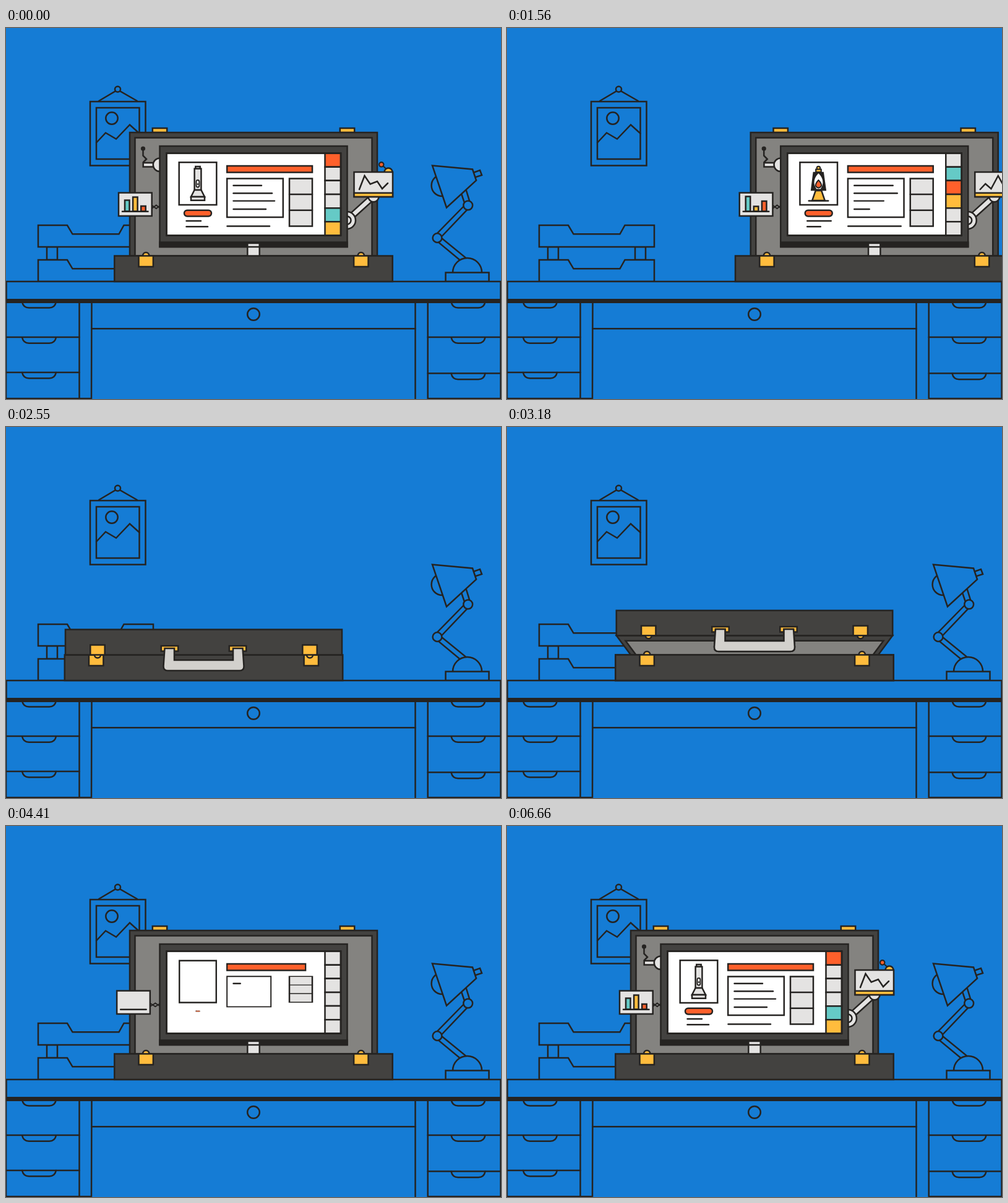
Recreate the animation shown at these times as an HTML page with a canvas. Size 800x600 px, loop 6690 ms.

```html
<!DOCTYPE html>
<html lang="en">
<head>
<meta charset="utf-8">
<title>Briefcase workstation</title>
<style>
html, body { margin: 0; width: 100%; height: 100%; overflow: hidden; background: #157cd5; }
canvas { display: block; width: 800px; height: 600px; }
</style>
</head>
<body>
<canvas id="stage" width="800" height="600"></canvas>
<script>
const g = document.getElementById('stage').getContext('2d');
const LOOP = 6690, STEP = 30;
const BLUE = '#157cd5', INK = '#252321', DARK = '#434240', GREY = '#848380',
  LIGHT = '#e4e3e2', WHITE = '#ffffff', ORANGE = '#ff602b', YELLOW = '#ffbc3d', TEAL = '#65cac6';
const CELL = { w: LIGHT, T: TEAL, O: ORANGE, Y: YELLOW };

// Easing
const clamp = u => Math.max(0, Math.min(1, u));
const span = (t, a, b) => clamp((t - a) / (b - a));
const smooth = u => u * u * (3 - 2 * u);
const easeOut = u => 1 - (1 - u) ** 3;
const backOut = (u, c) => 1 + (c + 1) * (u - 1) ** 3 + c * (u - 1) ** 2;
const mix = (a, b, u) => a + (b - a) * u;

// Drawing helpers
function paint(fill, line = 2.5) {
  if (fill) { g.fillStyle = fill; g.fill(); }
  if (line) { g.lineWidth = line; g.stroke(); }
}
function box(x1, y1, x2, y2, fill, line) {
  g.beginPath();
  g.rect(x1, y1, x2 - x1, y2 - y1);
  paint(fill, line);
}
function trace(p, close) {
  g.beginPath();
  for (let i = 0; i < p.length; i += 2) g.lineTo(p[i], p[i + 1]);
  if (close) g.closePath();
}
function poly(p, fill, line) { trace(p, true); paint(fill, line); }
function path(p, line) { trace(p); paint(null, line); }
function disc(x, y, r, fill, line) {
  g.beginPath();
  g.arc(x, y, r, 0, 7);
  paint(fill, line);
}
function dome(x, y, r, fill, down) {
  g.beginPath();
  g.arc(x, y, r, Math.PI, 0, !!down);
  paint(fill);
}
function bar(x1, y1, x2, y2, w, fill) {
  g.lineCap = 'butt';
  path([x1, y1, x2, y2], w + 5);
  g.strokeStyle = fill;
  path([x1, y1, x2, y2], w);
  g.strokeStyle = INK;
  g.lineCap = 'round';
}
function about(x, y, fn) {
  g.save();
  g.translate(x, y);
  fn();
  g.translate(-x, -y);
}

// Room
function picture() {
  path([150, 118, 180.5, 100, 212, 118]);
  disc(180.5, 99, 4.5, BLUE);
  box(136, 119, 225.5, 222.5, BLUE);
  box(146, 129, 215.5, 212);
  disc(171, 146, 9.7);
  path([146, 185.5, 161, 169.5, 178, 179.5, 200, 156.5, 215.5, 170.5]);
}
function trays() {
  box(66, 354, 83, 375, BLUE);
  box(207, 354, 224, 375, BLUE);
  for (const y of [319, 375])
    poly([52, y, 99, y, 107.5, y + 14.3, 182.5, y + 14.3, 190.5, y, 238, y, 238, y + 35, 52, y + 35], BLUE);
}
function pull(x, y) {
  g.beginPath();
  g.moveTo(x, y);
  g.quadraticCurveTo(x + 2, y + 9.5, x + 11, y + 9.5);
  g.lineTo(x + 44, y + 9.5);
  g.quadraticCurveTo(x + 53, y + 9.5, x + 55, y);
  paint();
}
function desk() {
  box(0.5, 410, 799.5, 441, BLUE);
  box(0, 441, 118.5, 599.3);
  path([118.5, 599.3, 138, 599.3, 138.5, 441]);
  box(681.7, 441, 799.5, 599.3);
  path([661.5, 441, 661.5, 599.3]);
  path([138.5, 486.3, 661.5, 486.3]);
  for (const y of [500, 557]) path([0, y, 118.5, y]);
  for (const y of [500, 558.5]) path([681.7, y, 800, y]);
  for (const y of [443, 500.3, 557]) pull(26, y);
  for (const y of [443, 500.3, 558.7]) pull(719.5, y);
  disc(400, 463, 9.8);
  box(0, 438, 800, 445, INK, 0);
}
function lamp() {
  poly([735, 265, 742, 286, 751, 286, 743, 260], BLUE);
  poly([741, 287, 694, 335, 700, 341.5, 747, 292], BLUE);
  poly([703, 339, 746, 374, 738, 379, 697, 345], BLUE);
  disc(746.7, 286.8, 7.4, BLUE);
  disc(697, 339.5, 7.4, BLUE);
  disc(705, 254.7, 17.4, BLUE);
  poly([755, 234, 766, 230, 769, 238, 758, 241.5], BLUE);
  poly([689, 222.5, 754, 228.5, 760, 246.5, 712, 290.5], BLUE);
  dome(745.5, 395.5, 23.5, BLUE);
  box(710.5, 395.5, 780.5, 410, BLUE);
}

// Case
function lidAngle(t) {
  if (t < 2000) return 90;
  if (t < 3068) return 0;
  if (t < 3360) return 0.000717 * (t - 3068) ** 2;
  if (t < 3520) { const d = t - 3360; return 61.1 + 0.419 * d - 0.00131 * d * d; }
  return mix(94.6, 90, smooth(span(t, 3520, 3960)));
}
function handle(y, k) {
  const at = d => y + d * k;
  g.beginPath();
  g.moveTo(337, y);
  g.lineTo(335, at(29));
  g.quadraticCurveTo(335, at(36), 342, at(36));
  g.lineTo(458, at(36));
  g.quadraticCurveTo(465, at(36), 465, at(29));
  g.lineTo(463, y);
  g.lineTo(447.5, y);
  g.lineTo(447.5, at(19));
  g.lineTo(352.5, at(19));
  g.lineTo(352.5, y);
  g.closePath();
  paint('#d3d1cd');
}
function lid(t) {
  const a = lidAngle(t) * Math.PI / 180, s = Math.sin(a), c = Math.cos(a);
  const edge = 368.5 - 199.5 * s, w = 200 + 23.5 * c, face = Math.max(0, 41 * c);
  const swung = t < 2000 || t > 3420;
  const k = t < 3450 ? mix(1, -1, smooth(span(t, 3220, 3450))) : mix(-1, 1, smooth(span(t, 3450, 3580)));
  const grip = edge - 10.5 * c;
  const showGrip = t > 2000 && t < 3580;
  if (swung && showGrip) handle(grip, k);
  const latchX = 151.5 + 20 * c, latchTop = edge - 16 * Math.max(0, c) - 7 * s * (1 - Math.max(0, c));
  const latches = () => {
    for (const x of [400 - latchX, 400 + latchX]) {
      if (c > 0.3) dome(x, edge, 5 * c, YELLOW, true);
      box(x - 11.7, latchTop, x + 11.7, edge, YELLOW);
    }
  };
  if (c < 0.05) latches();
  if (s > 0.01) {
    poly([400 - w, edge, 400 + w, edge, 600, 368.5, 200, 368.5], DARK);
    const top = edge + 8.5;
    if (top < 368) {
      const in1 = mix(w, 200, 8.5 / (368.5 - edge)) - 8.5;
      poly([400 - in1, top, 400 + in1, top, 591.5, 368.5, 208.5, 368.5], GREY);
    }
  }
  if (c >= 0.05) {
    box(400 - w, edge - face, 400 + w, edge, DARK);
    latches();
    for (const x of [345, 455]) box(x - 13.7, edge - 14.5 * c, x + 13.7, edge - 6 * c, YELLOW);
  }
  if (!swung) handle(grip, k);
}
function base() {
  box(175.3, 368.5, 624.7, 410, DARK);
}
function baseLatches() {
  for (const x of [226.2, 573.8]) {
    dome(x, 368, 5, YELLOW);
    box(x - 11.7, 368.5, x + 11.7, 386, YELLOW);
  }
}

// Data keyed at three moments of the running clock
const KEYS = [5220, 6675, 7980];
const BARS = [[11, 16.5, 23], [18, 23, 8.5], [24, 8, 16.5]];
const TEXT = [[437, 437, 425, 400], [413, 430, 434, 420], [430, 437, 415, 392]];
const NOTES = [[329, 318, 447], [315, 326, 426], [330, 313, 443]];
const CHART = [[260, 252, 257, 244, 256, 247], [261, 239, 252.5, 248, 260, 251], [261, 252, 260, 239, 253.5, 255.5]];
const CELLS = [[0, 'wwwwww'], [4560, 'wTwwOw'], [4900, 'TwOYww'], [5500, 'wTOwYw'], [5950, 'OwYwTw'],
  [6400, 'OwwwTY'], [6950, 'YwOwwT'], [7300, 'wTOwwY'], [7700, 'wTOYww']];
function keyed(rows, c) {
  const i = c < KEYS[1] ? 0 : 1, u = smooth(span(c, KEYS[i], KEYS[i + 1]));
  return rows[i].map((v, n) => mix(v, rows[i + 1][n], u));
}

// Gadgets around the screen
function barPanel(c) {
  const u = span(c, 4250, 4780);
  if (!u) return;
  const dx = 70 * (1 - backOut(u, 2.59)), from = 235.5 + dx, step = (250 - from) / 2;
  if (step > 0) for (let i = 0; i < 2; i++) {
    const x = from + i * step;
    path([x, 286.5, x + step, 292], 2);
    path([x, 292, x + step, 286.5], 2);
  }
  g.save();
  g.translate(dx, 0);
  box(182, 266.5, 235.7, 304, LIGHT);
  const rise = easeOut(span(c, 4550, 5150));
  keyed(BARS, c).forEach((h, i) => {
    const x = 192 + 13.1 * i;
    if (rise) box(x, 296.5 - h * rise, x + 7.5, 296.5, [TEAL, YELLOW, ORANGE][i]);
  });
  path([188, 296.7, 229.5, 296.7]);
  g.restore();
}
function aerial(c) {
  if (c < 6670) return mix(48, -48, (1 - Math.cos(Math.PI * span(c, 5270, 6670))) / 2);
  return -48 * Math.cos(Math.PI * (c - 6670) / 2050);
}
function chartArm(c) {
  const u = span(c, 4800, 5460);
  if (!u) return;
  about(551, 311, () => g.rotate(-Math.PI / 2 * (1 - backOut(u, 2))));
  bar(555, 307.4, 594, 272, 6.5, LIGHT);
  disc(594, 272.5, 8.7, LIGHT);
  const a = aerial(c) * Math.PI / 180;
  const x = 618 + 15.2 * Math.sin(a), y = 231 - 15.2 * Math.cos(a);
  path([618, 231, x, y], 2);
  disc(x, y, 3.7, ORANGE, 2.2);
  dome(618, 233, 6.5, YELLOW);
  box(562.5, 233, 625, 273, LIGHT);
  box(562.5, 266.7, 625, 273, YELLOW);
  const ys = keyed(CHART, c), xs = [571, 579.5, 588.7, 600, 608, 617];
  const reach = 5 * span(c, 4920, 5420), pts = [];
  for (let i = 0; i < 6 && i <= reach; i++) {
    pts.push(xs[i], ys[i]);
    const part = Math.min(1, reach - i);
    if (i < 5 && part > 0) pts.push(mix(xs[i], xs[i + 1], part), mix(ys[i], ys[i + 1], part));
  }
  path(pts);
  g.restore();
  disc(551, 311, 14, LIGHT);
  disc(551, 311, 6.5, LIGHT);
}
function antennaBox(c) {
  const u = span(c, 5800, 6250);
  if (!u) return;
  g.save();
  g.translate(42 * (1 - backOut(u, 1.7)), 0);
  path([221.5, 195, 221.5, 206.5, 227, 212, 222, 217]);
  disc(221.5, 195, 3.6, INK, 0);
  box(221.7, 218, 242, 224.5, LIGHT);
  disc(248.5, 221.3, 10.7, LIGHT);
  g.restore();
}

// Items on the screen
function axe() {
  box(307, 229, 313.3, 278, LIGHT);
  g.beginPath();
  g.moveTo(321, 231);
  g.quadraticCurveTo(327, 229, 328, 232);
  g.quadraticCurveTo(332, 241, 327, 250);
  g.quadraticCurveTo(325, 253, 321, 251);
  g.closePath();
  paint(WHITE);
  g.beginPath();
  g.moveTo(302.7, 234.3);
  g.lineTo(322, 231);
  g.quadraticCurveTo(326.5, 241, 322, 251.5);
  g.lineTo(302.7, 247);
  g.closePath();
  paint(ORANGE);
}
function torch() {
  box(306.3, 224, 313.7, 229, LIGHT);
  box(304.6, 227.5, 315.4, 262, LIGHT);
  poly([304.6, 262, 315.4, 262, 321, 273, 299, 273], LIGHT);
  box(299, 273, 321, 278.7, LIGHT);
  g.beginPath();
  g.roundRect(307.5, 246, 4.8, 11.5, 2.4);
  paint(WHITE, 2);
  disc(309.9, 252.5, 1.3, INK, 0);
}
function lantern() {
  poly([305, 263, 314.5, 263, 320, 279, 299.5, 279], YELLOW);
  path([294, 279.5, 325.5, 279.5]);
  disc(309.7, 226.5, 2.8, YELLOW, 2);
  poly([302, 234, 317, 234, 321, 262, 298.5, 262], INK);
  g.beginPath();
  g.moveTo(309.7, 234);
  g.quadraticCurveTo(323, 247, 313.5, 261);
  g.lineTo(306, 261);
  g.quadraticCurveTo(296.5, 247, 309.7, 234);
  paint(WHITE, 1.5);
  path([301.7, 246, 300.7, 260], 0.8);
  box(305.5, 228.5, 314, 233, YELLOW, 2.2);
  g.beginPath();
  g.moveTo(309.7, 246);
  g.quadraticCurveTo(319, 256, 309.7, 258.5);
  g.quadraticCurveTo(300.5, 256, 309.7, 246);
  paint(ORANGE, 2);
}
const ITEMS = [[4600, 5900, axe], [5900, 7250, torch], [7250, 9000, lantern]];

function content(c) {
  const grow = i => easeOut(span(c, 4090 + i * 60, 4440 + i * 60));
  // Grows a block out from one anchor point
  const block = (i, x, y, sx, sy, fn) => {
    const u = grow(i);
    if (!u) return;
    about(x, y, () => g.scale(sx ? u : 1, sy ? u : 1));
    fn();
    g.restore();
  };
  const line = (i, x, y, end) => {
    const u = grow(i);
    if (u) path([x, y, mix(x, end, u), y], 2.4);
  };
  block(0, 515.5, 202.5, 0, 1, () => {
    const row = CELLS.filter(r => r[0] <= c).pop()[1];
    for (let i = 0; i < 6; i++) {
      const y = 202.5 + 22.17 * i;
      box(515.5, y, 541, y + 22.17, CELL[row[i]]);
    }
  });
  block(1, 310, 251.5, 1, 1, () => box(279.7, 217.2, 340.3, 286, WHITE));
  block(2, 357, 228, 1, 0, () => box(357.2, 223, 495, 233.6, ORANGE));
  block(3, 357, 243, 1, 1, () => box(357.2, 243.4, 447.8, 306, WHITE));
  block(4, 476, 243, 0, 1, () => {
    box(458, 243.4, 495, 320.6, LIGHT);
    path([458, 269, 495, 269]);
    path([458, 294.8, 495, 294.8]);
  });
  block(5, 310, 299.5, 1, 1, () => {
    g.beginPath();
    g.roundRect(288, 294.8, 44, 9.6, 4.8);
    paint(ORANGE);
  });
  keyed(TEXT, c).forEach((x, i) => line(5 + i, 367.5, [254.7, 267.2, 279.6, 293][i], x));
  const notes = keyed(NOTES, c);
  line(6, 291.5, 312, notes[0]);
  line(7, 291.5, 321.3, notes[1]);
  line(8, 357.5, 320.5, notes[2]);
  for (const [a, b, draw] of ITEMS) {
    if (c < a || c >= b) continue;
    const u = backOut(span(c, a - STEP, a + 190), 1.7);
    about(310, 252, () => g.scale(u, u));
    draw();
    g.restore();
  }
}
function screen(c) {
  const u = span(c, 3420, 4110);
  if (!u) return;
  g.save();
  g.beginPath();
  g.rect(-1000, 0, 3000, 368.5);
  g.clip();
  g.translate(0, 180 * (1 - u) ** 4);
  box(248.5, 191, 551.5, 354, DARK);
  box(248.5, 346.5, 551.5, 354, INK);
  box(390.3, 348, 409.7, 390, LIGHT);
  path([390.3, 354, 409.7, 354]);
  box(259.5, 202.5, 541, 335.5, WHITE);
  content(c);
  box(259.5, 202.5, 541, 335.5);
  g.restore();
}

function caseShift(t) {
  if (t < 2000) return Math.max(0, (t - 1149) * 0.02) ** 2.5;
  return -(Math.max(0, (2985 - t) * 0.0133) ** 2.5);
}
function draw(t) {
  g.lineJoin = 'miter';
  g.lineCap = 'round';
  g.strokeStyle = INK;
  g.fillStyle = BLUE;
  g.fillRect(0, 0, 800, 600);
  picture();
  trays();
  lamp();
  desk();
  if (t >= 1830 && t < 2010) return;
  const c = t < 2000 ? t + LOOP : t;
  g.save();
  g.translate(caseShift(t), 0);
  if (lidAngle(t) < 30) {
    base();
    baseLatches();
    lid(t);
    if (lidAngle(t) > 4) { base(); baseLatches(); }
  } else {
    lid(t);
    antennaBox(c);
    barPanel(c);
    chartArm(c);
    screen(c);
    base();
    baseLatches();
  }
  // The closed grip hangs over the base while the lid is low
  if (t > 2000 && lidAngle(t) > 4 && lidAngle(t) < 30) {
    const a = lidAngle(t) * Math.PI / 180;
    handle(368.5 - 199.5 * Math.sin(a) - 10.5 * Math.cos(a), mix(1, -1, smooth(span(t, 3220, 3450))));
  }
  g.restore();
}

const start = performance.now();
function tick() {
  const t = (performance.now() - start) % LOOP;
  draw(Math.floor(t / STEP) * STEP);
  requestAnimationFrame(tick);
}
tick();
</script>
</body>
</html>
```
